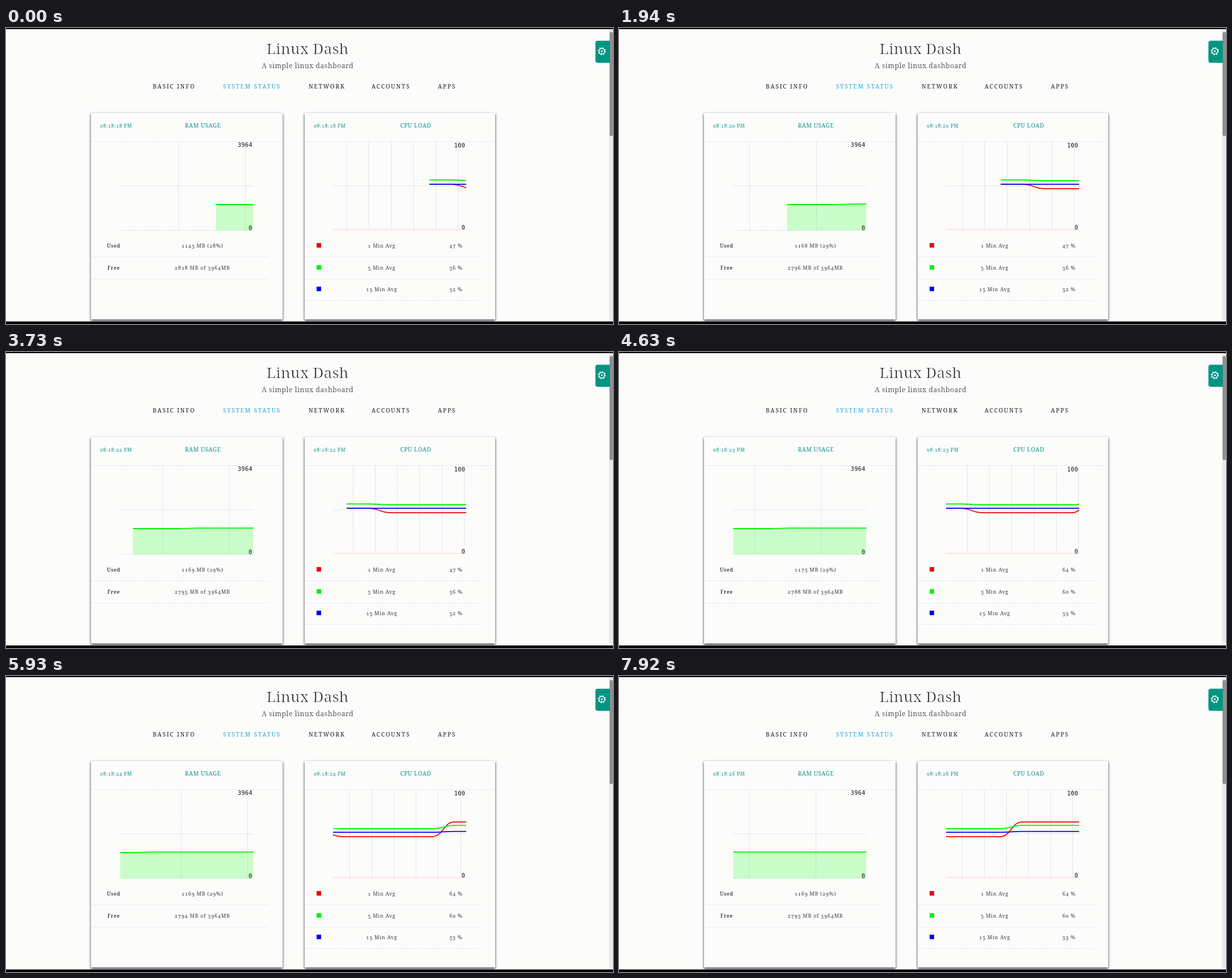
An HTML page that plays this animation: 1071 by 523 pixels, repeating every 8.02 s.

```html
<!DOCTYPE html>
<html lang="en">
<head>
<meta charset="utf-8">
<title>Linux Dash</title>
<style>
html, body { margin: 0; width: 100%; height: 100%; overflow: hidden; background: #fcfcfb; }
svg { display: block; width: 100%; height: 100%; }
text { font-family: "Noto Serif", serif; font-variant-numeric: oldstyle-nums; fill: #3a3a3a; }
/* A page-coloured outline thins the strokes to a light weight. */
.title { font-size: 26px; font-weight: 300; letter-spacing: .35px; fill: #222; stroke: #fcfcfb; stroke-width: .7px; }
.sub { font-size: 12px; font-weight: 300; letter-spacing: .63px; stroke: #fcfcfb; stroke-width: .15px; }
.nav { font-size: 10px; letter-spacing: 1.95px; fill: #1a1a1a; }
.on { fill: #22a7da; }
.clock { font-size: 8.5px; letter-spacing: .6px; fill: #0a9280; }
.head { font-size: 10px; letter-spacing: .6px; fill: #0a9280; }
.cell { font-size: 9px; letter-spacing: .7px; }
.key { font-size: 9px; font-weight: 500; letter-spacing: .7px; fill: #000; }
.axis { font: 10.2px "DejaVu Sans Mono", monospace; letter-spacing: .4px; fill: #111; }
.mid { text-anchor: middle; }
.end { text-anchor: end; }
.card { fill: #fcfcfb; filter: drop-shadow(0 2px 2.3px rgba(20, 20, 40, .9)); }
.rule { stroke: #e2e2f0; stroke-dasharray: 2 1; }
.grid { stroke: rgba(110, 110, 140, .25); stroke-dasharray: 2 1; fill: none; }
.line { fill: none; stroke-width: 1.8; }
</style>
</head>
<body>
<svg id="stage" viewBox="0 0 1071 523" preserveAspectRatio="none"></svg>
<script>
const LOOP = 8020, SECOND = 39.17;
const RAM = { x: 201.5, grid: 422, gap: SECOND * 3 };
const CPU = { x: 577, grid: 797.5, gap: SECOND };
const WIDTH = 235;

const TICKS = [0, 50, 1740, 3440, 3730, 6020];
// Chart travel in px by time.
const TRAVEL = [[0, 0], [1940, 73.5], [3730, 146], [4630, 183], [5930, 230.5], [6720, 262], [7920, 310]];
// Used and free memory for each second of the clock.
const MEMORY = [[1145, 2818], [1167, 2796], [1168, 2796], [1168, 2795], [1169, 2795],
  [1175, 2788], [1169, 2794], [1178, 2786], [1169, 2795]];
const LOADS = [
  { name: '1 Min Avg', color: '#f00000', drawn: [52, 47, 64], shown: [47, 64] },
  { name: '5 Min Avg', color: '#00f400', drawn: [57, 56, 60], shown: [56, 60] },
  { name: '15 Min Avg', color: '#0000f0', drawn: [52, 52, 53], shown: [52, 53] }
];

const text = (x, y, cls, str, id = '') => `<text x="${x}" y="${y}" class="${cls}" id="${id}">${str}</text>`;
const rect = (x, y, w, h, fill, more = '') =>
  `<rect x="${x}" y="${y}" width="${w}" height="${h}" fill="${fill}" ${more}/>`;
const hline = (x1, x2, y, cls, more = '') => `<path d="M${x1} ${y}H${x2}" class="${cls}" ${more}/>`;
const bend = (x, from, to) =>
  `H${x}C${x + SECOND / 2} ${from} ${x + SECOND / 2} ${to} ${x + SECOND} ${to}`;
const loadY = v => 355.7 - 1.53 * v;

function loadPath([a, b, c]) {
  const [ya, yb, yc] = [a, b, c].map(loadY);
  return `M747 ${ya}${bend(785.5, ya, yb)}${bend(982.5, yb, yc)}H1200`;
}

const clip = (id, x) => `<clipPath id="${id}"><rect x="${x}" y="201" width="${WIDTH}" height="157"/></clipPath>`;

function card(x, w, id, name, mid) {
  return rect(x, 150, w, 365, '', 'class="card"') + hline(x, x + w, 200.5, 'rule') +
    text(x + 16, 175.5, 'clock', '', id) + text(mid, 175.5, 'head mid', name);
}

function ramCard() {
  const top = `M370 312${bend(448, 312, 311.2)}H800`;
  return card(150, 338, 'ramClock', 'RAM USAGE', 347.5) +
    hline(201.5, 436.5, 279, 'grid') + hline(201.5, 436.5, 357.5, 'rule') +
    '<path id="ramGrid" class="grid"/>' +
    `<g clip-path="url(#ramClip)"><g id="ramData">
      <path d="${top}V358H370Z" fill="rgba(0,255,0,.2)"/>
      <path d="${top}" class="line" stroke="#00f400"/></g></g>` +
    text(434.8, 210.3, 'axis end', '3964') + text(434.6, 356.8, 'axis end', '0') +
    text(190, 388, 'key mid', 'Used') + text(190, 426.5, 'key mid', 'Free') +
    text(346.5, 388, 'cell mid', '', 'used') + text(346.5, 426.5, 'cell mid', '', 'free') +
    hline(150, 463, 404.5, 'rule') + hline(150, 463, 443.5, 'rule');
}

function cpuCard() {
  const rows = LOADS.map((row, i) => {
    const y = 380 + i * 38.5;
    return rect(548, Math.round(y), 8, 8, row.color) + text(662.8, y + 8, 'cell mid', row.name) +
      text(794, y + 8, 'cell mid', '', 'load' + i) + hline(527, 840, Math.floor(y + 24.5) + .5, 'rule');
  }).join('');
  const lines = LOADS.map(r => `<path d="${loadPath(r.drawn)}" class="line" stroke="${r.color}"/>`).join('');
  return card(527, 336, 'cpuClock', 'CPU LOAD', 723) +
    hline(577, 812, 279, 'grid') + '<path id="cpuGrid" class="grid"/>' +
    hline(577, 812, 356, '', 'stroke="#f8cdd2"') +
    `<g clip-path="url(#cpuClip)"><g id="cpuData">${lines}</g></g>` +
    text(810.4, 210.7, 'axis end', '100') + text(810.4, 356.3, 'axis end', '0') + rows;
}

function gear() {
  const step = Math.PI * 2 * 6.3 / 8;
  return '<path d="M1065.5 22.5H1044a4 4 0 0 0-4 4V57.5a4 4 0 0 0 4 4H1065.5Z" fill="#009582"/>' +
    '<g transform="translate(1051.3 41)" fill="none" stroke="#fff">' +
    `<circle r="6.3" stroke-width="1.6" stroke-dasharray="${step * .4} ${step * .6}"/>` +
    '<circle r="5" stroke-width="1.4"/><circle r="1.6" stroke="none" fill="#fff"/></g>';
}

const nav = [[259, 'BASIC INFO'], [383, 'SYSTEM STATUS'], [534, 'NETWORK'], [645, 'ACCOUNTS'], [762, 'APPS']];

document.getElementById('stage').innerHTML =
  `<defs>${clip('ramClip', RAM.x)}${clip('cpuClip', CPU.x)}</defs>` +
  rect(0, 0, 1071, 523, '#fcfcfb') +
  text(532.2, 45.7, 'title mid', 'Linux Dash') + text(532.3, 71, 'sub mid', 'A simple linux dashboard') +
  nav.map(([x, s], i) => text(x, 107, i === 1 ? 'nav on' : 'nav', s)).join('') +
  ramCard() + cpuCard() +
  rect(1064, 2, 7, 513, '#e9e9e9') + rect(1065, 7, 6, 184, '#8f8f8f', 'rx="3"') + gear() +
  rect(0, 0, 1071, 2, '#000') + rect(0, 518.5, 1071, 4.5, '#000');

const el = id => document.getElementById(id);

function tick(t) {
  const start = TICKS.filter(s => s <= t).pop();
  const now = start + Math.floor((t - start) / 100) * 100;
  return start === 1740 ? Math.min(now, 2940) : now;
}

function travel(t) {
  const i = Math.max(1, TRAVEL.findIndex(([at]) => at >= t));
  const [t0, a] = TRAVEL[i - 1], [t1, b] = TRAVEL[i];
  return a + (b - a) * (t - t0) / (t1 - t0);
}

function gridPath({ x, grid, gap }, shift) {
  let d = '';
  const first = grid - shift;
  for (let k = Math.ceil((x - first) / gap); first + k * gap < x + WIDTH; k++)
    d += `M${Math.floor(first + k * gap) + .5} 201V357`;
  return d;
}

function put(id, str) {
  if (el(id).textContent !== str) el(id).textContent = str;
}

function render(time) {
  const t = tick(time % LOOP), shift = travel(t);
  el('ramGrid').setAttribute('d', gridPath(RAM, shift));
  el('cpuGrid').setAttribute('d', gridPath(CPU, shift));
  for (const id of ['ramData', 'cpuData']) el(id).setAttribute('transform', `translate(${-shift} 0)`);

  const sec = Math.min(Math.floor((t + 600) / 1000), MEMORY.length - 1);
  const [used, free] = MEMORY[sec];
  const clock = `08:18:${18 + sec} PM`;
  put('ramClock', clock);
  put('cpuClock', clock);
  put('used', `${used} MB (${Math.floor(used / 39.64)}%)`);
  put('free', `${free} MB of 3964MB`);
  LOADS.forEach((row, i) => put('load' + i, `${row.shown[sec < 5 ? 0 : 1]} %`));
}

const origin = performance.now();
function loop() {
  render(performance.now() - origin);
  requestAnimationFrame(loop);
}
loop();
</script>
</body>
</html>
```
